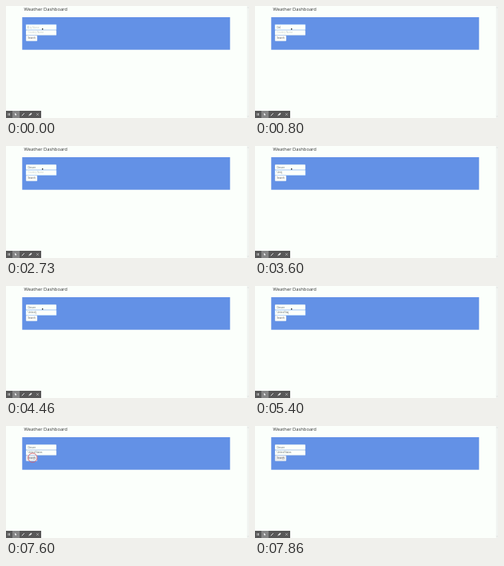
An HTML page with a canvas for the animation above (8 s loop, 304 by 140 pixels).

```html
<!DOCTYPE html>
<html lang="en">
<head>
<meta charset="utf-8">
<title>Weather Dashboard</title>
<style>
html, body { margin: 0; width: 100%; height: 100%; overflow: hidden; background: #fbfffb; }
canvas { display: block; width: 304px; height: 140px; }
</style>
</head>
<body>
<canvas></canvas>
<script>
const LOOP = 8000;
const canvas = document.querySelector('canvas');
const ctx = canvas.getContext('2d');
const scale = window.devicePixelRatio || 1;
canvas.width = 304 * scale;
canvas.height = 140 * scale;

const FONT = '"Open Sans", "Noto Sans", sans-serif';
const cityKeys = [330, 800, 1000, 1130, 1330, 1530];
const countryKeys = [2930, 3330, 3460, 3530, 3660, 4130, 4460, 5000, 5200, 5400, 5600, 5800, 6060];
const moveSteps = [7130, 7200, 7330, 7400, 7530];
const caretOff = [[60, 330], [2730, 2930], [6600, LOOP]];

const countPassed = (times, t) => times.filter(time => t >= time).length;
const typed = (text, keys, t) => text.slice(0, countPassed(keys, t));

function rect(x, y, w, h, color) {
  ctx.fillStyle = color;
  ctx.fillRect(x, y, w, h);
}

function box(x, y, w, h, fill, stroke) {
  ctx.beginPath();
  ctx.roundRect(x, y, w, h, 0.7);
  ctx.fillStyle = fill;
  ctx.fill();
  ctx.strokeStyle = stroke;
  ctx.lineWidth = 0.2;
  ctx.stroke();
}

function label(text, x, y, size, color, weight = 400) {
  ctx.font = `${weight} ${size}px ${FONT}`;
  ctx.fillStyle = color;
  ctx.fillText(text, x, y);
  return ctx.measureText(text).width;
}

function line(color, width, ...points) {
  ctx.beginPath();
  points.forEach(([x, y]) => ctx.lineTo(x, y));
  ctx.strokeStyle = color;
  ctx.lineWidth = width;
  ctx.stroke();
}

function arrow(x, y, color) {
  ctx.beginPath();
  [[0, 0], [0, 3], [0.8, 2.3], [1.3, 3.3], [1.8, 3], [1.3, 2.1], [2.2, 2]]
    .forEach(([dx, dy]) => ctx.lineTo(x + dx, y + dy));
  ctx.fillStyle = color;
  ctx.fill();
}

function field(y, h, value, placeholder, focus, caret) {
  if (focus) {
    box(24.6, y - 0.4, 38.8, h + 0.8, `rgba(190,220,255,${0.5 * focus})`, 'transparent');
  }
  box(25, y, 38, h, '#fbfffb', focus ? '#80bdff' : '#ced4da');
  const base = y + h / 2 + 1.05;
  const width = label(value || placeholder, 27.4, base, 2.9, value ? '#5c6268' : '#c3c9c9');
  if (caret) rect(27.4 + (value ? width : 0), base - 2.8, 0.25, 3.5, '#444');
}

function toolbar() {
  rect(0, 131, 44, 9, '#585858');
  rect(8, 131, 9, 9, '#858585');
  rect(2.6, 134, 0.7, 3, '#eee');
  rect(4.1, 134, 0.7, 3, '#eee');
  arrow(11.2, 133.7, '#fff');
  line('#eee', 0.9, [19.8, 137.2], [22.8, 134.1]);
  line('#eee', 1.5, [29.3, 136.5], [32, 134.1]);
  line('#eee', 0.6, [28.2, 137.2], [29.5, 136.2]);
  line('#eee', 0.5, [38.2, 134.2], [40.8, 136.8]);
  line('#eee', 0.5, [40.8, 134.2], [38.2, 136.8]);
}

function scrollbar() {
  rect(301.6, 0, 2.4, 140, '#f0f3f0');
  line('#aaa', 0.4, [302.3, 2.3], [302.8, 1.7], [303.3, 2.3]);
  line('#aaa', 0.4, [302.3, 137.7], [302.8, 138.3], [303.3, 137.7]);
}

function pointer(t) {
  const p = countPassed(moveSteps, t) / moveSteps.length;
  if (t < 6800) {
    rect(45, 28, 1.4, 1.6, '#333');
  } else if (p < 0.6) {
    rect(45.8 - 11.2 * p, 31.5 + 7.5 * p, 0.6, 2.4, '#444');
  } else {
    // Hand cursor
    const x = 45.8 - 11.2 * p, y = 31.5 + 7.5 * p;
    box(x, y, 0.6, 2, '#fff', '#444');
    box(x - 0.3, y + 1, 1.7, 1.6, '#fff', '#444');
  }
  if (t >= 7530 && t < 7860) {
    ctx.beginPath();
    ctx.arc(33.3, 39.7, t < 7600 ? 4 : 5.7, 0, 2 * Math.PI);
    ctx.strokeStyle = t < 7660 ? '#d8606a' : 'rgba(216,96,106,.6)';
    ctx.lineWidth = 0.9;
    ctx.stroke();
  }
}

function draw(t) {
  ctx.setTransform(scale, 0, 0, scale, 0, 0);
  rect(0, 0, 304, 140, '#fbfffb');
  label('Weather Dashboard', 22.6, 5.8, 5.8, '#333', 500);
  rect(20.3, 14, 260, 40.7, '#6391e6');

  const caret = !caretOff.some(([a, b]) => t >= a && t < b);
  const onCity = t < 2060;
  const onCountry = !onCity && t < 7600;
  field(23.2, 6.6, typed('Denver', cityKeys, t), 'City Name', onCity ? 1 : 0, onCity && caret);
  field(30.2, 6.4, typed('United States', countryKeys, t), 'Country Name',
    onCountry ? (t < 2200 ? 0.5 : 1) : 0, onCountry && caret);

  box(25.1, 37.1, 13.9, 6.6, t >= 7400 ? '#e8ebee' : '#f8faf8', '#f8faf8');
  label('Search', 27.4, 41.4, 3, '#555');

  toolbar();
  scrollbar();
  pointer(t);
}

function tick() {
  draw(performance.now() % LOOP);
  requestAnimationFrame(tick);
}
tick();
</script>
</body>
</html>
```
